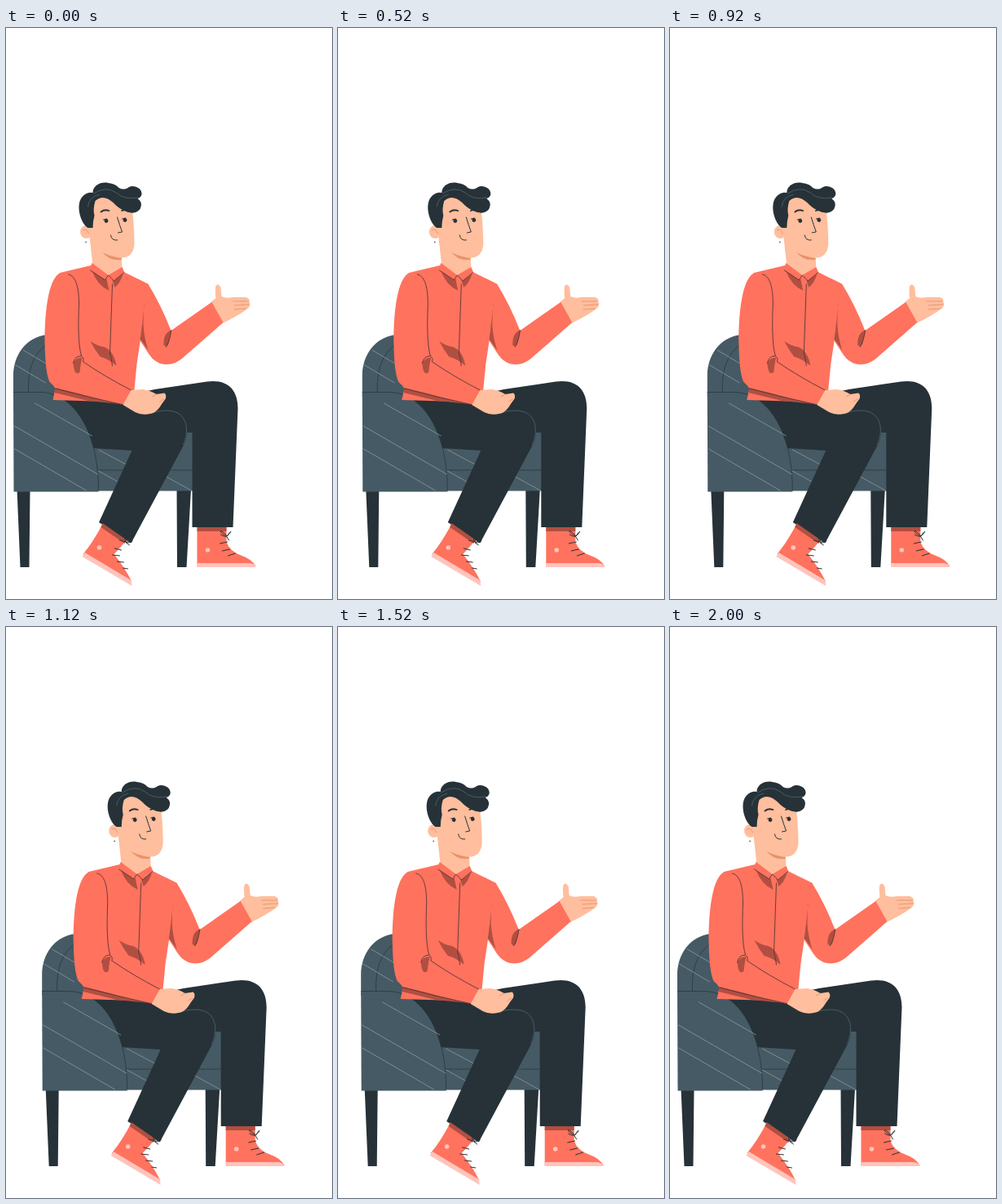
Recreate the animation shown at these times as an HTML page. Size 400x700 px, loop 2.04 s.

```html
<!DOCTYPE html>
<html lang="en">
<head>
<meta charset="utf-8">
<title>Seated man</title>
<style>
  html, body { margin: 0; width: 100%; height: 100%; overflow: hidden; background: #fff; }
  svg { display: block; width: 400px; height: 700px; }
  .coral { fill: #ff725e; }
  .dark { fill: #263238; }
  .chair { fill: #455a64; }
  .skin { fill: #ffbe9d; }
  .shade { fill: #b04f41; }
  .pale { fill: #ffc4bc; }
  .ink, .fold, .brow, .seam, .stripe, .crease { fill: none; stroke-linecap: round; stroke-linejoin: round; }
  .ink { stroke: #263238; stroke-width: 1; }
  .fold { stroke: #5a3635; stroke-width: .9; }
  .brow { stroke: #263238; stroke-width: 1.8; }
  .seam { stroke: #54666f; stroke-width: .8; }
  .stripe { stroke: #8c9aa1; stroke-width: .8; }
  .crease { stroke: #e6936c; stroke-width: .9; }
</style>
</head>
<body>
<svg viewBox="-0.5 0 400 700">
  <g id="scene">
    <!-- chair -->
    <path class="dark" d="M13 566H29L28 661H17ZM209 566H226.500L221 661H209.500Z"/>
    <path class="chair" d="M8.500 452V425C9 402 23 379 50 376L90 455ZM100 495H229V567.500H100Z"/>
    <path class="ink" d="M27 446C26 421 32 401 48 389M113 542H228" opacity=".7"/>
    <path class="stripe" d="M21 395L48 411M11 413L48 435M113 517L158 541M113 543L156 567M196 550L227 567"/>

    <!-- trousers -->
    <path class="dark" d="M150 450L182 443L246 433.500C272 430 284 444 284 466L278 612H228V496H170Z"/>
    <path class="dark" d="M58 450H150L185 468C212 466 225 481 221 501Q220 508 216 514L153 631.500L113.500 606L154 518L105 515Z"/>
    <path class="seam" d="M172 473C190 468 205 467 213 474C223 482 223 498 217 511"/>

    <!-- armrest -->
    <path class="chair" d="M8.500 446H40C80 446 113 490 113 568.500H9Z"/>
    <path class="ink" d="M9 446.500H40C80 446 113 490 113 567" opacity=".7"/>
    <path class="stripe" d="M35 460L105 500M10 488L112 547M10 516L98 567"/>

    <!-- shoes -->
    <path class="coral" d="M118 608L147 628Q140 637 132 645Q145 661 154 679L94 645Q106 631 118 608Z"/>
    <path class="shade" d="M118 607L148 628L145 632L116 612Z"/>
    <path class="pale" d="M96 643L153 677L154 684L93 648Z"/>
    <path class="coral" d="M234 612H270V630Q274 642 289 647Q301 651 306 660H234Z"/>
    <path class="shade" d="M234 612H270V617H234Z"/>
    <path class="pale" d="M234 656H299Q305 657 306 661H234Z"/>
    <circle class="pale" cx="247" cy="640" r="2.800"/>
    <circle class="pale" cx="114" cy="637" r="2.800"/>
    <path class="ink" d="M262 632L271 630M265 641L274 639M272 647L281 644M263 621Q268 624 270 623C258 616 262 613 271 623C276 613 278 618 270 623L273 628M133 638L141 640M130 646L139 647M136 654L144 655M143 662L149 663M139 628L146 630C143 620 149 624 147 631C156 625 158 631 147 631L151 634"/>

    <!-- raised hand and arm -->
    <path class="skin" d="M251 336L257 331C256 325 256 319 257 316Q260 312 263 318L264 329Q269 332 278 330L294 330Q299 332 298 335Q300 341 296 344Q284 353 265 362Z"/>
    <path class="crease" d="M278 335L297 335M280 340L298 339M280 345L294 344"/>
    <path class="coral" d="M160 307L174 314Q190 340 202 371L252 336L266 361L218 403C203 417 185 415 175 400L160 377Z"/>
    <path class="shade" d="M168.500 338Q165 360 164 381L174 395Q169 380 168 364ZM203 370Q192 374 193 389Q197 392 199 387Z"/>
    <path class="fold" d="M169 337Q166 354 164.500 382M202 371Q201 382 196 391"/>

    <!-- shirt -->
    <path class="coral" d="M104 291L66 300C51 308 47 349 47 384C47.500 410 49 425 53 434Q58 438 60 442L57 456L157 459V443L160 412L164.500 382L170 333L174 314L144 299Z"/>
    <path class="shade" d="M60 441L140 461L100 457L59 447ZM103 384Q112 390 120 391Q132 396 135 414Q126 406 115 403Q108 394 103 384ZM105 298L123 308L126 322Q112 316 105 298ZM130 309L144 299Q140 313 133 318Z"/>
    <path class="coral" d="M55 420L92 406L153 444L144 462Q94 452 55 435Z"/>
    <path class="shade" d="M82 411Q85 404 93 404Q91 411 90 422Q85 426 83 418Z"/>
    <path class="fold" d="M76 302C87 304 89 323 89 339C88 364 88 388 92 402Q84 402 82 411M92 402Q96 405 94 409Q120 427 153 444M60 442Q102 453 144 462M130 314L127 399Q129 404 130 414"/>

    <!-- resting hand -->
    <path class="skin" d="M143 462L153 444L167 443Q176 444 184 449L194 447.500Q197 450 195 455Q191 460 188 465Q183 472 176 473Q166 475 158 471Z"/>
    <path class="crease" d="M184 449L179 452M193 455L188 458"/>

    <!-- neck and collar -->
    <path class="skin" d="M102 255L106 292L124 304L142 295L141 268Z"/>
    <path fill="#e6936c" d="M117 274Q127 281 141 280V284Q126 286 117 274Z"/>
    <path class="coral" d="M105 288L102 296L121 309L125 303ZM142 293L125 303L132 310L145 300Z"/>
    <path class="fold" d="M103 297L121 309L125 303L132 310L144 300"/>

    <!-- head -->
    <ellipse class="skin" cx="98" cy="250" rx="7.500" ry="8"/>
    <path class="crease" d="M94 248Q99 245 101 252"/>
    <path class="skin" d="M102 235L108 209L125 204L154 219Q157 242 157 265C156 279 147 284 135 281Q114 277 103 262Z"/>
    <path class="dark" d="M100 245C91 239 86 220 91 210C95 203 101 201 106 202C106 193 116 188 125 190Q134 191 138 196Q144 199 149 196C155 191 167 196 166 204Q165 208 161 209Q168 214 164 222Q158 229 149 225.500Q139 223 131 214Q119 203 109 212Q106 222 108 230Q106 237 106 245Z"/>
    <path class="seam" d="M107 203Q122 193 135 202Q144 211 161 208M100 219Q101 207 114 204"/>
    <circle class="dark" cx="122.500" cy="236.500" r="2.400"/>
    <circle class="dark" cx="145.500" cy="235.500" r="2.400"/>
    <circle class="dark" cx="97.500" cy="262.500" r=".8"/>
    <path class="brow" d="M116 225.500Q120 222 126 224M141.500 224Q146 222 149.500 225"/>
    <path class="ink" d="M119 235L123 234M142 234L146 233M136 232Q139 242 142 250L137 251M128 254Q129 261 136 260"/>
  </g>
</svg>
<script>
  const scene = document.getElementById("scene");
  const STEP = 40, STEPS = 51, HALF = 25, REACH = 40;
  const start = performance.now();

  // Slide right and back at constant speed in 40 ms steps.
  function draw(now) {
    const step = Math.floor(Math.max(0, now - start) / STEP) % STEPS;
    const x = REACH * (1 - Math.abs(step - HALF) / HALF);
    scene.setAttribute("transform", `translate(${x} 0)`);
    requestAnimationFrame(draw);
  }
  draw(start);
</script>
</body>
</html>
```
